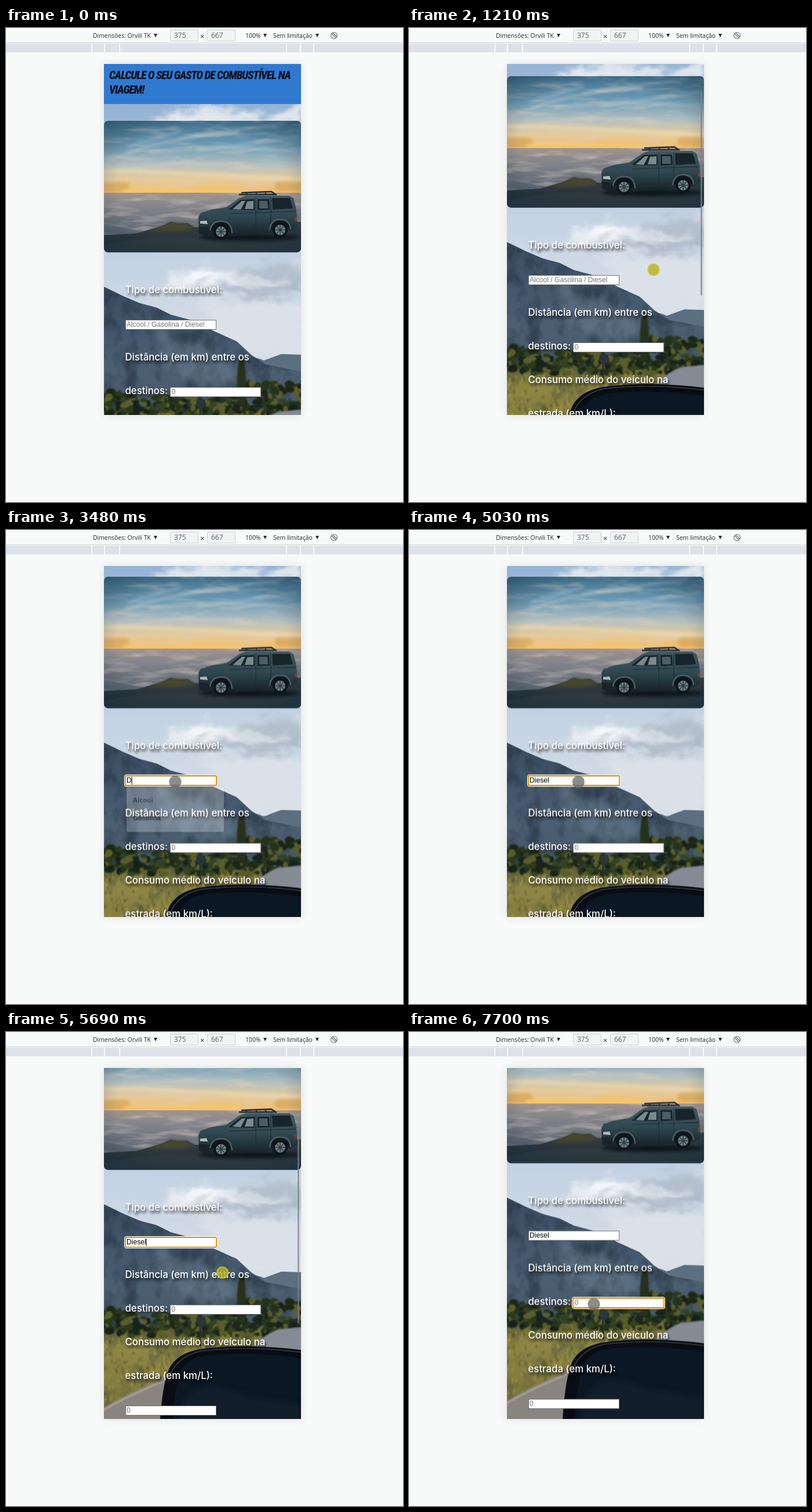
These frames come from a looping animation (685 by 817 pixels, 8 s). An HTML page:

```html
<!DOCTYPE html>
<html lang="pt-BR">
<head>
<meta charset="utf-8">
<title>Gasto de combustível</title>
<style>
html, body { margin: 0; width: 100%; height: 100%; overflow: hidden; background: #f8faf9; }
body { position: relative; }
div, span, i, b { box-sizing: border-box; }

/* device toolbar */
.bar { position: absolute; inset: 0 0 auto; height: 26px; border-bottom: 1px solid #cfd2d6;
  font: 10.4px/26px "Open Sans", sans-serif; color: #26292c; white-space: nowrap; }
.bar > * { position: absolute; top: 0; }
.bar .drop::after { content: ""; display: inline-block; margin-left: 5px; vertical-align: 1px;
  border: 3.5px solid transparent; border-top: 6px solid #26292c; border-bottom: 0; }
.bar .size { top: 3px; width: 49px; height: 20px; padding-left: 6px; border: 1px solid #cbd0d2;
  border-radius: 2px; background: #f0f4f3; font-size: 12px; line-height: 18px; color: #5a5f64; }
.ruler { position: absolute; top: 27px; left: 0; right: 0; height: 15px; background: #dfe1e8; }
.ruler i { position: absolute; top: 0; width: 2px; height: 100%; background: #f8faf9; }

/* phone */
.phone { position: absolute; left: 169px; top: 62px; width: 340px; height: 604.5px; overflow: hidden; }
.glow { position: absolute; left: 169px; top: 62px; width: 340px; height: 604.5px; box-shadow: 0 0 14px #0000001c; }
.page { position: absolute; left: 0; top: 0; width: 340px; height: 790px; will-change: transform;
  animation: scroll 8s linear infinite; }
.page > svg { position: absolute; left: 0; top: 0; }
h1 { position: absolute; left: 0; top: 0; margin: 0; width: 340px; height: 68.5px; padding: 7px 0 0 9px;
  box-sizing: border-box; background: #2f79d1; color: #05080c; white-space: nowrap;
  font: italic 700 19px/25px "Roboto Condensed", "Open Sans Condensed", Roboto, sans-serif;
  font-stretch: 75%; letter-spacing: -.05em; }
.labels { position: absolute; left: 36.5px; top: 360px; white-space: pre; color: #fff;
  font: 500 16.8px/58px Inter, sans-serif; text-shadow: 2px 4px 4px #000c; }
.field { position: absolute; width: 157px; height: 17px; padding-left: 1.5px; border: 1px solid #767676;
  background: #fff; font: 12.1px/15px "Liberation Sans", Arial, sans-serif; color: #757575; white-space: pre; }
.ring { position: absolute; inset: -2px; border: 2px solid #e19409; border-radius: 3px;
  box-shadow: 0 0 0 1px #fff; animation: 8s step-end infinite; }
.caret { position: absolute; left: 1.5px; top: 1px; width: 1px; height: 13px; background: #000;
  animation: 8s step-end infinite; }
.typed::before { content: "Alcool / Gasolina / Diesel"; animation: type 8s step-end infinite; }
.fuel .ring { animation-name: focus1; }
.fuel .caret { animation-name: blink1, travel; }
.dist .ring { animation-name: focus2; }
.dist .caret { animation-name: blink2; }
.list { position: absolute; left: 39px; top: 460.5px; width: 168px; height: 77px; padding: 7px 11px;
  border-radius: 3px; background: #fff; box-shadow: 0 2px 6px #0005; color: #222;
  font: 700 11.3px/31px "Liberation Sans", Arial, sans-serif; animation: list 8s linear infinite; }
.thumb { position: absolute; right: 3.5px; top: 5px; width: 3px; height: 351px; border-radius: 2px;
  background: #7d8288; animation: thumb 8s linear infinite, thumbFade 8s linear infinite; }
.pointer { position: absolute; left: -10.5px; top: -10.5px; width: 21px; height: 21px; border-radius: 50%;
  animation: move 8s linear infinite, press 8s step-end infinite; }

@keyframes scroll {
  0%, 12.125% { transform: none; }
  15.125% { transform: translateY(-77px); }
  16.25%, 67.25% { transform: translateY(-79.5px); }
  69.5% { transform: translateY(-123.5px); }
  71.875%, 100% { transform: translateY(-160.5px); }
}
@keyframes thumb {
  0%, 12.125% { transform: none; }
  15.125% { transform: translateY(43.5px); }
  16.25%, 67.25% { transform: translateY(45px); }
  69.5% { transform: translateY(69.5px); }
  71.875%, 100% { transform: translateY(90.5px); }
}
@keyframes thumbFade {
  0%, 12% { opacity: 0; }
  12.2%, 20.875% { opacity: .7; }
  23.375%, 67.2% { opacity: 0; }
  67.4%, 77% { opacity: .7; }
  79.375% { opacity: .2; }
  81.125%, 100% { opacity: 0; }
}
@keyframes move {
  0%, 3.25% { transform: translate(668px, 773px); }
  9.875%, 11.625% { transform: translate(430px, 504px); }
  15.125% { transform: translate(421.5px, 416px); }
  16.25% { transform: translate(420px, 413px); }
  20.875%, 62.875% { transform: translate(291.5px, 433.5px); }
  66.625% { transform: translate(377px, 495px); }
  69.5% { transform: translate(375px, 439px); }
  71.875% { transform: translate(372px, 403px); }
  74.875% { transform: translate(325px, 470px); }
  77%, 100% { transform: translate(318.5px, 468.5px); }
}
@keyframes press {
  0%, 23.375%, 77% { opacity: 0; }
  3.25%, 16.25%, 40.125%, 72.25%, 80.25% { opacity: 1; background: #606060b8; box-shadow: inset 0 0 0 1px #7777; }
  11.625%, 66.625% { opacity: 1; background: #b8b01fd0; box-shadow: inset 0 0 0 2px #d0c832c0; }
  100% { opacity: 1; background: #606060b8; }
}
@keyframes type {
  0% { content: "Alcool / Gasolina / Diesel"; color: #757575; }
  41.875% { content: "D"; color: #000; }
  44.25% { content: "Di"; color: #000; }
  45.875% { content: "Die"; color: #000; }
  50% { content: "Dies"; color: #000; }
  54.375% { content: "Diese"; color: #000; }
  56%, 100% { content: "Diesel"; color: #000; }
}
@keyframes travel {
  0% { transform: none; }
  41.875% { transform: translateX(8.7px); }
  44.25% { transform: translateX(11.4px); }
  45.875% { transform: translateX(18.2px); }
  50% { transform: translateX(24.2px); }
  54.375% { transform: translateX(30.9px); }
  56%, 100% { transform: translateX(33.6px); }
}
@keyframes focus1 { 0%, 77%, 100% { opacity: 0; } 21.75% { opacity: 1; } }
@keyframes focus2 { 0% { opacity: 0; } 77%, 100% { opacity: 1; } }
@keyframes blink1 { 0%, 29%, 62.875%, 74.375%, 100% { opacity: 0; } 21.75%, 35.75%, 68.75% { opacity: 1; } }
@keyframes blink2 { 0%, 84.5%, 96.25%, 100% { opacity: 0; } 77%, 90.25% { opacity: 1; } }
@keyframes list {
  0%, 21.7% { opacity: 0; }
  23.375%, 41.875% { opacity: 1; }
  43.5% { opacity: .24; }
  45.875%, 100% { opacity: 0; }
}
</style>
</head>
<body>
<div class="bar">
  <span class="drop" style="left:150px">Dimensões: Orvili TK</span>
  <span class="size" style="left:283px">375</span>
  <span style="left:335px;font-size:13px;top:1px">×</span>
  <span class="size" style="left:347px">667</span>
  <span class="drop" style="left:413px">100%</span>
  <span class="drop" style="left:461px">Sem limitação</span>
  <svg style="left:559px;top:6px" width="14" height="14" fill="none" stroke="#66696d" stroke-width="1.1">
    <circle cx="7" cy="7" r="5.5"/><path d="M3 4 10 11M5 2.500 12 9.500"/>
  </svg>
</div>
<div class="ruler">
  <i style="left:147px"></i><i style="left:169px"></i><i style="left:195px"></i>
  <i style="left:483px"></i><i style="left:507px"></i><i style="left:530px"></i>
</div>

<div class="glow"></div>
<div class="phone">
  <div class="page">
    <svg width="340" height="790" viewBox="169 62 340 790">
      <defs>
        <linearGradient id="sky" x2="0" y2="1">
          <stop stop-color="#82a9d4"/><stop offset=".13" stop-color="#94b3d4"/>
          <stop offset=".6" stop-color="#c2d1e2"/><stop offset="1" stop-color="#dce2e9"/>
        </linearGradient>
        <linearGradient id="hill" x2="0" y2="1">
          <stop stop-color="#3a4d63"/><stop offset=".6" stop-color="#4c6074"/><stop offset="1" stop-color="#43525c"/>
        </linearGradient>
        <linearGradient id="grass" x2="0" y2="1">
          <stop stop-color="#6a6a33"/><stop offset=".2" stop-color="#8f8645"/><stop offset="1" stop-color="#6f6a34"/>
        </linearGradient>
        <linearGradient id="dusk" x2="0" y2="1">
          <stop stop-color="#437390"/><stop offset=".35" stop-color="#6e9db8"/><stop offset=".6" stop-color="#b3bfc0"/>
          <stop offset=".8" stop-color="#e6cb9c"/><stop offset="1" stop-color="#f2bb66"/>
        </linearGradient>
        <linearGradient id="mist" x2="0" y2="1">
          <stop stop-color="#a1948c"/><stop offset=".3" stop-color="#84858c"/><stop offset="1" stop-color="#586370"/>
        </linearGradient>
        <linearGradient id="ground" x2="0" y2="1">
          <stop stop-color="#394145"/><stop offset="1" stop-color="#1c272e"/>
        </linearGradient>
        <linearGradient id="paint" x2="0" y2="1">
          <stop stop-color="#43575f"/><stop offset=".5" stop-color="#2f4750"/><stop offset="1" stop-color="#141e23"/>
        </linearGradient>
        <radialGradient id="shade" r=".72">
          <stop offset=".6" stop-color="#142c3c" stop-opacity="0"/><stop offset="1" stop-color="#142c3c" stop-opacity=".45"/>
        </radialGradient>
        <filter id="soft" x="-50%" y="-50%" width="200%" height="200%"><feGaussianBlur stdDeviation="6"/></filter>
        <filter id="wisp" x="-20%" y="-100%" width="140%" height="300%"><feGaussianBlur stdDeviation="2.5"/></filter>
        <filter id="lens"><feGaussianBlur stdDeviation="1.3"/></filter>
        <filter id="puff" x="-30%" y="-50%" width="160%" height="200%" color-interpolation-filters="sRGB">
          <feGaussianBlur stdDeviation="7" result="b"/>
          <feTurbulence type="fractalNoise" baseFrequency=".03 .045" numOctaves="4" seed="4"/>
          <feDisplacementMap in="b" scale="34" xChannelSelector="R" yChannelSelector="G"/>
        </filter>
        <filter id="rock" x="0" y="0" width="100%" height="100%" color-interpolation-filters="sRGB">
          <feTurbulence type="fractalNoise" baseFrequency=".035 .025" numOctaves="4" seed="9"/>
          <feColorMatrix values="0 0 0 0 .12  0 0 0 0 .18  0 0 0 0 .22  3 0 0 0 -1.3"/>
          <feComposite in2="SourceAlpha" operator="in"/>
        </filter>
        <filter id="layer" x="0" y="0" width="100%" height="100%" color-interpolation-filters="sRGB">
          <feTurbulence type="fractalNoise" baseFrequency=".018 .1" numOctaves="3" seed="2"/>
          <feColorMatrix values="0 0 0 0 .88  0 0 0 0 .82  0 0 0 0 .76  3 0 0 0 -1.4"/>
          <feComposite in2="SourceAlpha" operator="in"/>
        </filter>
        <clipPath id="frame"><rect x="169" y="160" width="340" height="226.500" rx="7"/></clipPath>
      </defs>

      <!-- landscape -->
      <rect x="169" y="62" width="340" height="540" fill="url(#sky)"/>
      <g filter="url(#puff)">
        <path d="M260 155Q330 125 400 145T515 120V170H250Z" fill="#e2e7ee"/>
        <path d="M280 430Q330 405 390 420T515 395V455Q430 450 380 462T270 450Z" fill="#e6ebf0"/>
        <path d="M310 452Q360 436 420 447T515 420V450Q460 475 410 462T310 462Z" fill="#a9b6c5"/>
        <path d="M400 420Q450 398 515 412V434Q460 442 400 430Z" fill="#b3bfcc"/>
        <path d="M330 478Q410 460 515 478V560H390Z" fill="#dae1e9"/>
        <ellipse cx="335" cy="426" rx="28" ry="7" fill="#fff"/>
      </g>
      <path d="M400 572Q420 562 445 573L475 562 509 563V690H400Z" fill="#5b6f81"/>
      <path id="near" d="M169 446 200 461 230 474 260 482 284 494 329 506 360 523 398 540 424 564 448 580 509 592V690H169Z" fill="url(#hill)"/>
      <use href="#near" filter="url(#rock)" opacity=".55"/>
      <path d="M255 505 300 540 345 550 385 575 400 610 340 615 290 600 262 560Z" fill="#8097a6" opacity=".28" filter="url(#soft)"/>
      <g filter="url(#lens)">
        <path id="field" d="M160 658H520V860H160Z" fill="url(#grass)"/>
        <use href="#field" filter="url(#rock)" opacity=".35"/>
        <g id="trees"></g>
        <path d="M399 650Q397 590 403 570 407 563 411 573 416 600 413 650Z" fill="#25331f"/>
        <path d="M470 662 520 657V702H420Q436 675 470 662Z" fill="#858b94"/>
        <g id="blades"></g>
        <path d="M160 802Q215 768 300 734L320 860H160Z" fill="#8a8480"/>
        <path d="M160 805Q220 770 292 743" fill="none" stroke="#b3aaa0" stroke-width="2"/>
      </g>
      <path d="M335 655V690" stroke="#28302c" stroke-width="3"/><path d="M329 640H343L346 650 336 658 328 650Z" fill="#28353a"/>
      <path d="M264 852Q267 765 281 730 294 704 332 696 410 685 509 697V852Z" fill="#090d13"/>
      <path d="M285 852Q289 760 304 728 316 708 360 705 430 700 509 711V852Z" fill="#0b1723"/>
      <path d="M280 750Q290 710 335 699 410 689 509 701" fill="none" stroke="#36414b" stroke-width="1.500"/>
      <path d="M300 800Q320 745 380 765T509 790V852H295Z" fill="#16222d" opacity=".7" filter="url(#soft)"/>

      <!-- sunset card -->
      <g clip-path="url(#frame)">
        <rect id="dome" x="169" y="160" width="340" height="126" fill="url(#dusk)"/>
        <use href="#dome" filter="url(#layer)" opacity=".35"/>
        <g filter="url(#wisp)" fill="none" stroke-linecap="round">
          <path d="M175 232Q260 188 400 180M250 215Q360 200 500 212M190 250Q300 222 430 240" stroke="#d9d3c3" stroke-width="5" opacity=".4"/>
          <path d="M300 190 480 164M330 212 500 188M210 205 300 178" stroke="#cbd9dd" stroke-width="4" opacity=".35"/>
          <path d="M169 246Q280 248 509 262" stroke="#f2dcb0" stroke-width="7" opacity=".6"/>
          <path d="M169 274H205M472 272H509" stroke="#c7953e" stroke-width="17" opacity=".45"/>
          <path d="M205 280H400" stroke="#fac866" stroke-width="5"/>
        </g>
        <rect id="sea" x="169" y="284" width="340" height="76" fill="url(#mist)"/>
        <use href="#sea" filter="url(#layer)" opacity=".45"/>
        <path d="M169 357 225 354 250 347 270 341 284 334 297 337 313 336 324 343 345 345 509 334V387H169Z" fill="url(#ground)"/>
        <path d="M245 350 268 342 284 335 312 337 326 345 300 350Z" fill="#46462f" filter="url(#wisp)"/>
        <path d="M169 374Q260 355 340 362L509 360V387H169Z" fill="#2f3a41" opacity=".8"/>
        <rect x="169" y="160" width="340" height="227" fill="url(#shade)"/>
        <!-- car -->
        <ellipse cx="420" cy="361" rx="86" ry="6" fill="#10181c" filter="url(#wisp)"/>
        <path d="M402 287H464M406 284 458 282 467 288M415 288V283M432 288V283M448 288V283" fill="none" stroke="#202b30" stroke-width="2.500"/>
        <path d="M332 326 336 319 354 313 380 309 403 293 414 289 488 289 496 293 501 312 503 343 492 350 384 360 349 361 333 354Z" fill="url(#paint)"/>
        <path d="M384 313 405 296 429 295V314ZM434 295 454 295 455 313 434 314ZM459 293 490 293 495 311 460 313Z" fill="#17252b"/>
        <path d="M391 312 407 298 413 298 405 313ZM412 312 416 299 427 298V312Z" fill="#9aabad" opacity=".75"/>
        <path d="M437 298H451L452 311H437Z" fill="#63777e" opacity=".7"/>
        <path d="M431 293V350M457 292V348M385 320 500 316" fill="none" stroke="#1b2a31"/>
        <path d="M335 333 346 332 348 338 335 337Z" fill="#b5bdba"/><path d="M332 342 352 344 352 357 334 353Z" fill="#192329"/>
        <path d="M352 349Q355 332 373 333 389 334 390 353M455 348Q457 329 474 330 490 331 491 347" fill="#10191d" stroke="#4c5f68" stroke-width="2.500"/>
        <g fill="#6f8088" stroke="#0d1418" stroke-width="4"><circle cx="371" cy="351" r="11"/><circle cx="473" cy="348" r="11"/></g>
        <path d="M371 342V360M362 351H380M365 345 377 357M377 345 365 357M473 339V357M464 348H482M467 342 479 354M479 342 467 354" stroke="#2c3b42" stroke-width="1.500"/>
        <path d="M498 326H502V333H498Z" fill="#7c3a2c"/>
      </g>
    </svg>
    <h1><span>CALCULE O SEU GASTO DE COMBUSTÍVEL NA</span><br>VIAGEM!</h1>
    <div class="labels">Tipo de combustível:

Distância (em km) entre os
destinos:
Consumo médio do veículo na
estrada (em km/L):</div>
    <div class="field fuel" style="left:36.5px;top:440.5px"><span class="typed"></span><i class="ring"></i><i class="caret"></i></div>
    <div class="field dist" style="left:114px;top:556.5px">0<i class="ring"></i><i class="caret"></i></div>
    <div class="field" style="left:36.5px;top:730.5px">0</div>
    <div class="list">Alcool<br>Gasolina</div>
  </div>
  <div class="thumb"></div>
</div>
<div class="pointer"></div>

<script>
let seed = 7;
const rand = (a, b) => a + (b - a) * ((seed = seed * 16807 % 2147483647) / 2147483647);
const pick = list => list[Math.floor(rand(0, list.length))];
const fill = (id, n, make) => {
  document.getElementById(id).innerHTML = Array.from({ length: n }, make).join('');
};

const greens = ['#1a2618', '#22301d', '#2a381f', '#344322', '#19231d', '#5a5f2c'];
fill('trees', 420, () => {
  const x = rand(162, 516), top = x > 415 ? 612 : 633 + 6 * Math.sin(x / 17);
  return `<ellipse cx="${x}" cy="${rand(top, 673)}" rx="${rand(3, 9)}" ry="${rand(3, 7)}" fill="${pick(greens)}"/>`;
});

const straws = ['#a3974c', '#5f602b', '#aa9c52', '#46491f', '#878039'];
fill('blades', 260, () => {
  const x = rand(165, 400), y = rand(676, 800 - (x - 169) * .4);
  return `<path d="M${x} ${y}l${rand(-2, 3)} ${-rand(4, 10)}" stroke="${pick(straws)}" stroke-width="3" opacity=".6"/>`;
});

// Pick the heading size that suits whichever condensed face is installed.
const title = document.querySelector('h1');
title.style.fontSize = 19 * 313 / title.firstChild.getBoundingClientRect().width + 'px';
</script>
</body>
</html>
```
